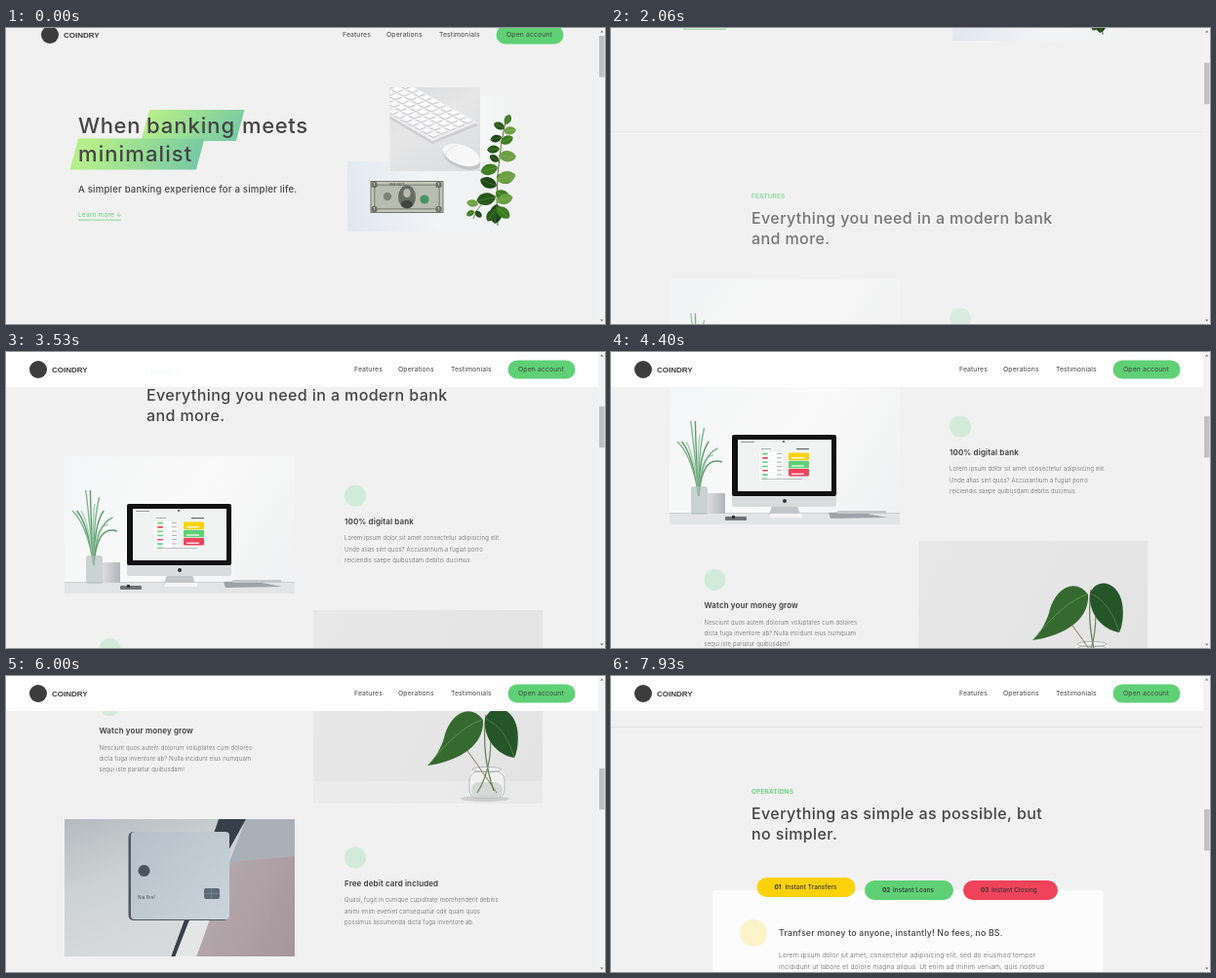
Animation of 614 by 304 pixels, one loop 8 s. Source, as an HTML page with a canvas:

```html
<!DOCTYPE html>
<html lang="en">
<head>
<meta charset="utf-8">
<title>Banking landing page</title>
<style>
  html, body { margin: 0; width: 100%; height: 100%; overflow: hidden; background: #f1f1f1; }
  canvas { display: block; width: 614px; height: 304px; }
</style>
</head>
<body>
<canvas id="stage"></canvas>
<script>
const W = 614, H = 304, LOOP = 8000, STEP = 200 / 3;
const SANS = 'Inter, "Open Sans", sans-serif';
const PAGE = '#f1f1f1', INK = '#444', GREEN = '#5fd075', YELLOW = '#fbd20a', RED = '#f0435c';
const BRAND = 'COINDRY';
const dpr = Math.max(1, Math.round(window.devicePixelRatio || 1));

// ---------- drawing helpers ----------
function text(g, str, x, y, size, weight = 400, color = INK, track = 0.02) {
  g.font = `${weight} ${size}px ${SANS}`;
  g.letterSpacing = size * track + 'px';
  g.fillStyle = color;
  g.fillText(str, x, y + size * 0.36);
}

function rect(g, x, y, w, h, fill, r = 0) {
  g.fillStyle = fill;
  g.beginPath();
  g.roundRect(x, y, w, h, r);
  g.fill();
}

function disc(g, x, y, rx, fill, ry = rx, turn = 0) {
  g.fillStyle = fill;
  g.beginPath();
  g.ellipse(x, y, rx, ry, turn, 0, 7);
  g.fill();
}

function poly(g, fill, ...p) {
  g.fillStyle = fill;
  g.beginPath();
  for (let i = 0; i < p.length; i += 2) g.lineTo(p[i], p[i + 1]);
  g.fill();
}

function curve(g, color, width, x0, y0, cx, cy, x1, y1) {
  g.strokeStyle = color;
  g.lineWidth = width;
  g.beginPath();
  g.moveTo(x0, y0);
  g.quadraticCurveTo(cx, cy, x1, y1);
  g.stroke();
}

function leaf(g, x, y, len, wide, deg, color) {
  g.save();
  g.translate(x, y);
  g.rotate(deg * Math.PI / 180);
  g.fillStyle = color;
  g.beginPath();
  g.moveTo(0, 0);
  g.bezierCurveTo(len * 0.2, -wide, len * 0.8, -wide, len, 0);
  g.bezierCurveTo(len * 0.8, wide, len * 0.2, wide, 0, 0);
  g.fill();
  curve(g, 'rgba(200,230,150,.35)', 0.5, 0, 0, len / 2, 0, len, 0);
  g.restore();
}

function blend(g, x0, y0, x1, y1, ...colors) {
  const grad = g.createLinearGradient(x0, y0, x1, y1);
  colors.forEach((c, i) => grad.addColorStop(i / (colors.length - 1), c));
  return grad;
}

function photo(g, x, y, w, h, fill, paint) {
  g.save();
  g.beginPath();
  g.rect(x, y, w, h);
  g.clip();
  rect(g, x, y, w, h, fill);
  g.translate(x, y);
  paint(g);
  g.restore();
}

// A part of the page, painted once in page coordinates.
function layer(top, height, paint) {
  const c = document.createElement('canvas');
  c.width = W * dpr;
  c.height = height * dpr;
  const g = c.getContext('2d');
  g.scale(dpr, dpr);
  g.translate(0, -top);
  paint(g);
  return { c, top, height };
}

// ---------- page parts ----------
function nav(g, pad, y) {
  disc(g, 33 + pad, y, 9, '#3c3c3c');
  g.font = 'bold 8px "Liberation Sans", Arial, sans-serif';
  g.letterSpacing = '0px';
  g.fillStyle = '#3c3c3c';
  g.fillText(BRAND, 47 + pad, y + 3);
  text(g, 'Features', 357 - pad, y, 6.8);
  text(g, 'Operations', 402 - pad, y, 6.8);
  text(g, 'Testimonials', 456 - pad, y, 6.8);
  rect(g, 514.5 - pad, y - 9.6, 69, 19.2, GREEN, 9.6);
  text(g, 'Open account', 525 - pad, y, 6.8);
}

function highlight(g, x, y, w, h) {
  const skew = h * 0.27;
  poly(g, blend(g, x + w, y + h, x + w * 0.25, y - h * 0.6, '#71c6a6', '#b5ee8a'),
    x + skew, y, x + w, y, x + w - skew, y + h, x, y + h);
}

function keyboard(g) {
  poly(g, '#cfcfd1', 393, 93, 437, 119, 484, 100, 415, 61, 393, 61);
  poly(g, '#efeff0', 393, 90, 437, 116, 483, 97, 415, 59, 393, 59);
  for (let row = 0; row < 5; row++) {
    for (let k = 0; k < 11; k++) {
      const x = 432 + row * 8.6 - k * 7, y = 109 - row * 3.6 - k * 3.95;
      poly(g, '#bfc0c3', x, y + 1, x + 6, y + 4, x + 12.6, y + 1.2, x + 6.4, y - 2);
      poly(g, '#fbfbfb', x, y, x + 6, y + 3, x + 12.2, y + 0.4, x + 6.4, y - 2.6);
    }
  }
}

function bill(g) {
  rect(g, 373.5, 157, 75, 33, '#73776d');
  rect(g, 374.5, 158, 73, 31, '#c3c6ba');
  rect(g, 377, 160.5, 68, 26, '#8b9084');
  rect(g, 378.5, 162, 65, 23, '#b9bdb0');
  text(g, 'ONE NOTE', 393, 160.5, 3, 600, '#53584e');
  for (const [x, y] of [[376, 161], [442, 161], [376, 186], [442, 186]]) {
    disc(g, x + 1.5, y, 3.2, '#6d7267');
    text(g, '1', x + 0.6, y, 4, 700, '#e2e4da');
  }
  disc(g, 411, 173.5, 9, '#686d64', 12);
  disc(g, 411, 169.5, 3.6, '#b7baad', 4.5);
  disc(g, 411, 181, 6, '#3f443d', 4);
  disc(g, 391, 173, 4.2, '#7c8176');
  disc(g, 429, 176, 4.6, '#4b9363');
}

function branch(g) {
  curve(g, '#55703a', 1, 504, 203, 500, 150, 513, 90);
  curve(g, '#55703a', 0.8, 503, 172, 484, 178, 479, 196);
  const tones = ['#3f7d24', '#28591b', '#6d9f45', '#1f4717'];
  const leaves = [
    [512, 99, 11, -65], [511, 103, 12, -155], [510, 106, 13, -5], [508, 112, 12, 165],
    [507, 118, 14, -25], [506, 124, 13, 175], [505, 131, 18, 5], [505, 137, 11, -145],
    [504, 143, 18, 165], [503, 152, 16, 20], [503, 156, 20, -15], [503, 162, 18, 200],
    [502, 168, 17, 30], [502, 174, 20, 170], [503, 178, 17, -15], [503, 181, 20, 95],
    [503, 184, 17, 40], [502, 186, 15, 125], [484, 181, 12, 190], [481, 188, 9, 45],
    [480, 188, 9, 150]
  ];
  leaves.forEach(([x, y, len, deg], i) => leaf(g, x, y, len, len * 0.42, deg, tones[i % 4]));
}

function paintHeader(g) {
  nav(g, 12, 7);
  highlight(g, 138.5, 84, 106, 32);
  highlight(g, 65.5, 113.5, 138, 32);
  text(g, 'When', 74, 100, 22, 500, INK, 0.03);
  text(g, 'banking', 144, 100, 22, 500, INK, 0.045);
  text(g, 'meets', 242, 100, 22, 500, INK, 0.03);
  text(g, 'minimalist', 74, 129.5, 22, 500, INK, 0.05);
  text(g, 'A simpler banking experience for a simpler life.', 74, 166, 9.6, 450);
  text(g, 'Learn more ↓', 74, 191.5, 6.6, 400, GREEN);
  rect(g, 74, 196.7, 44, 0.7, GREEN);

  rect(g, 486, 70, 46, 139, blend(g, 486, 0, 532, 0, '#f6f7f7', PAGE));
  rect(g, 350, 137, 182, 72, blend(g, 350, 209, 532, 160, '#e0e7f0', '#f2f4f6', PAGE));
  g.save();
  g.beginPath();
  g.rect(393.5, 61, 92.5, 86);
  g.clip();
  rect(g, 393, 61, 94, 86, blend(g, 393, 61, 440, 147, '#d9dadb', '#e7e7e8', '#dedfe0'));
  keyboard(g);
  disc(g, 468, 133, 21, '#c3c4c6', 11, 0.35);
  disc(g, 467, 130.5, 20, '#f7f7f7', 10, 0.35);
  curve(g, '#d3d4d6', 0.7, 450, 131, 453, 122, 463, 121);
  g.restore();
  bill(g);
  branch(g);
}

function desk(g) {
  rect(g, 0, 129, 236, 13, '#e3e4e6');
  rect(g, 0, 129, 236, 1, '#cfd1d3');
  // plant and pots
  for (let i = 0; i < 11; i++) {
    const x = 8 + i * 4.6, y = 28 + Math.abs(i - 4) * 7 + (i % 3) * 7;
    curve(g, ['#7eb58c', '#5d9a6d', '#a5cfae'][i % 3], 1.4, 30, 112, 28 + (i - 5), 70, x, y);
  }
  rect(g, 22, 102, 17, 29, 'rgba(176,190,188,.65)', 3);
  rect(g, 39, 109, 18, 21, blend(g, 39, 0, 57, 0, '#dcdddf', '#b2b4b8'), 1);
  rect(g, 57, 133, 22, 4, '#6f7275', 1);
  rect(g, 64, 132, 3, 3, '#2f3133');
  // monitor
  poly(g, '#c4c7ca', 105, 122, 131, 122, 134, 131, 102, 131);
  rect(g, 64, 110, 107, 13, '#d9dbdd', 2);
  rect(g, 64, 49, 107, 63, '#111', 2);
  rect(g, 70, 54, 96, 53, '#f1f2f2');
  disc(g, 118, 117, 2, '#333');
  rect(g, 73, 56, 14, 1, '#999');
  disc(g, 117, 56, 1.2, '#777');
  rect(g, 94, 63, 10, 1, '#aaa');
  rect(g, 130, 63, 13, 1.2, '#666');
  for (let i = 0; i < 7; i++) {
    const y = 67 + i * 4.3;
    rect(g, 92, y, 24, 3.4, '#fff');
    rect(g, 95, y + 0.8, 6, 1.6, i % 3 == 1 ? RED : GREEN, 0.8);
    rect(g, 110, y + 1, 5, 1, '#aaa');
  }
  [YELLOW, GREEN, RED].forEach((c, i) => {
    rect(g, 122, 67.5 + i * 8.3, 21, 7.4, c, 1);
    rect(g, 125, 72 + i * 8.3, 13, 1.4, 'rgba(255,255,255,.85)');
  });
  rect(g, 94, 94, 42, 1, '#bbb');
  // keyboard and notebook
  poly(g, '#9fa3a7', 163, 129, 192, 128, 223, 134, 165, 135);
  rect(g, 172, 127, 50, 3, '#c5c8cb', 1);
  rect(g, 103, 130, 33, 4, '#f6f6f6', 1);
}

function vase(g) {
  rect(g, 0, 118, 236, 24, 'rgba(255,255,255,.22)');
  disc(g, 176, 136, 25, 'rgba(120,120,120,.25)', 3);
  rect(g, 160, 104, 36, 33, 'rgba(248,249,249,.6)', 9);
  rect(g, 162, 119, 32, 17, 'rgba(175,187,183,.45)', 8);
  curve(g, '#5f7a4b', 1.2, 185, 128, 172, 90, 177, 50);
  curve(g, '#6d8957', 1.2, 168, 130, 187, 100, 180, 52);
  curve(g, '#80764f', 1, 188, 130, 168, 100, 150, 76);
  g.strokeStyle = 'rgba(150,155,155,.8)';
  g.lineWidth = 0.8;
  g.beginPath();
  g.ellipse(178, 106, 15, 2.6, 0, 0, 7);
  g.roundRect(160, 108, 36, 28, 9);
  g.stroke();
  g.fillStyle = '#35692f';
  g.beginPath();
  g.moveTo(174, 55);
  g.bezierCurveTo(160, 36, 139, 50, 134, 74);
  g.bezierCurveTo(130, 86, 124, 96, 117, 102);
  g.bezierCurveTo(140, 99, 176, 86, 174, 55);
  g.fill();
  g.fillStyle = '#27552a';
  g.beginPath();
  g.moveTo(176, 54);
  g.bezierCurveTo(183, 36, 205, 42, 209, 64);
  g.bezierCurveTo(211, 76, 209, 88, 206, 94);
  g.bezierCurveTo(188, 91, 174, 74, 176, 54);
  g.fill();
  curve(g, '#76a062', 0.7, 173, 55, 150, 62, 118, 101);
  curve(g, '#5f8d58', 0.7, 177, 54, 196, 62, 206, 93);
}

function card(g) {
  poly(g, '#aab0b7', 186, 0, 236, 0, 236, 62, 162, 62);
  poly(g, blend(g, 150, 104, 236, 141, '#b3a6aa', '#a5969c'), 150, 98, 172, 44, 236, 38, 236, 142, 133, 142);
  poly(g, '#e4e6e6', 122, 100, 150, 100, 135, 142, 112, 142);
  poly(g, '#36404b', 158, 0, 186, 0, 127, 106, 113, 142, 109, 142, 122, 106);
  rect(g, 65.5, 13, 103, 91, '#4f5963', 5);
  rect(g, 68, 13, 101, 90, blend(g, 68, 13, 169, 104, '#b5c0ca', '#cbd4dc'), 4);
  disc(g, 81.5, 53, 6, '#4a545f');
  text(g, 'Nia Brel', 75, 80.5, 4.6, 400, '#4c545c');
  rect(g, 143, 71, 16, 11, '#5b6a77', 2);
  rect(g, 143, 76, 16, 0.6, '#8695a1');
  rect(g, 150.5, 71, 0.6, 11, '#8695a1');
}

function sectionHead(g, top, label, a, b) {
  rect(g, 0, top, 607, 0.5, '#d5d5d5');
  text(g, label, 144, top + 67, 6.6, 600, GREEN, 0.01);
  text(g, a, 144, top + 89, 16, 500, INK, 0.025);
  text(g, b, 144, top + 110, 16, 500, INK, 0.025);
}

function feature(g, x, y, title, lines) {
  disc(g, x + 11, y + 40.5, 11, '#d2ebd8');
  text(g, title, x, y + 67, 8, 600, '#3c3c3c', 0.015);
  lines.forEach((s, i) => text(g, s, x, y + 84 + i * 11.4, 6, 300, '#666'));
}

function paintFeatures(g) {
  sectionHead(g, 293, 'FEATURES', 'Everything you need in a modern bank', 'and more.');
  photo(g, 60, 445, 236, 141, blend(g, 60, 445, 296, 586, '#f4f5f6', '#fafafa', '#eff0f1'), desk);
  feature(g, 347, 445, '100% digital bank', [
    'Lorem ipsum dolor sit amet consectetur adipisicing elit.',
    'Unde alias sint quos? Accusantium a fugiat porro',
    'reiciendis saepe quibusdam debitis ducimus.']);
  photo(g, 315, 603, 235, 141, blend(g, 315, 603, 550, 744, '#e8e8e8', '#e3e3e4'), vase);
  feature(g, 95.5, 602.5, 'Watch your money grow', [
    'Nesciunt quos autem dolorum voluptates cum dolores',
    'dicta fuga inventore ab? Nulla incidunt eius numquam',
    'sequi iste pariatur quibusdam!']);
  photo(g, 60, 760, 236, 141, blend(g, 60, 760, 110, 901, '#b5babf', '#cdd2d4', '#d6dada'), card);
  feature(g, 347, 759, 'Free debit card included', [
    'Quasi, fugit in cumque cupiditate reprehenderit debitis',
    'animi enim eveniet consequatur odit quam quos',
    'possimus assumenda dicta fuga inventore ab.']);
}

function tab(g, x, y, w, fill, num, label) {
  rect(g, x, y, w, 20, fill, 10);
  text(g, num, x + 18, y + 10, 6.3, 700, '#333');
  text(g, label, x + 29, y + 10, 6.3, 450, '#333');
}

function paintOperations(g) {
  sectionHead(g, 963, 'OPERATIONS', 'Everything as simple as possible, but', 'no simpler.');
  rect(g, 104, 1131, 400.5, 140, '#fcfcfc', 3);
  tab(g, 149.5, 1118, 101, YELLOW, '01', 'Instant Transfers');
  tab(g, 260, 1121, 91, GREEN, '02', 'Instant Loans');
  tab(g, 361, 1121, 97, RED, '03', 'Instant Closing');
  disc(g, 146, 1175, 14, '#fdf3cb');
  text(g, 'Tranfser money to anyone, instantly! No fees, no BS.', 172, 1175, 8.8, 450);
  text(g, 'Lorem ipsum dolor sit amet, consectetur adipisicing elit, sed do eiusmod tempor', 172, 1197.5, 6.8, 300, '#666');
  text(g, 'incididunt ut labore et dolore magna aliqua. Ut enim ad minim veniam, quis nostrud', 172, 1210, 6.8, 300, '#666');
}

const header = layer(-11, 304, paintHeader);
const features = layer(293, 670, paintFeatures);
const operations = layer(963, 300, paintOperations);

// ---------- motion ----------
const SCROLL = [
  [0, 0], [730, 75], [1130, 109], [1460, 109], [2060, 195], [3530, 338], [3660, 349],
  [4000, 349], [4530, 429], [4860, 429], [5130, 474], [5530, 549], [5730, 549],
  [6400, 709], [6600, 709], [6930, 777], [7930, 911]
];
const STICKY_AT = 257, RISE = 32;

function scrollAt(t) {
  const i = SCROLL.findIndex(k => k[0] > t);
  if (i < 0) return SCROLL[SCROLL.length - 1][1];
  const [t0, y0] = SCROLL[i - 1], [t1, y1] = SCROLL[i];
  return y0 + (y1 - y0) * (t - t0) / (t1 - t0);
}

// CSS "ease": cubic-bezier(.25, .1, .25, 1)
function ease(x) {
  if (x <= 0) return 0;
  if (x >= 1) return 1;
  const bez = (a, b, u) => 3 * a * u * (1 - u) ** 2 + 3 * b * u * u * (1 - u) + u ** 3;
  let lo = 0, hi = 1;
  for (let i = 0; i < 20; i++) {
    const mid = (lo + hi) / 2;
    if (bez(0.25, 0.25, mid) < x) lo = mid; else hi = mid;
  }
  return bez(0.1, 1, lo);
}

const stage = document.getElementById('stage');
stage.width = W * dpr;
stage.height = H * dpr;
const g = stage.getContext('2d');
g.scale(dpr, dpr);

function place(part, scroll, shown = 1) {
  if (shown <= 0) return;
  const y = Math.round((part.top - scroll + RISE * (1 - shown)) * dpr) / dpr;
  if (y > H || y + part.height < 0) return;
  g.globalAlpha = shown;
  g.drawImage(part.c, 0, y, W, part.height);
  g.globalAlpha = 1;
}

function scrollbar(scroll) {
  rect(g, 607.3, 0, 6.7, H, '#f2f2f2');
  rect(g, 608, 8 + scroll * 0.1414, 5.6, 42.5, '#c1c1c1');
  poly(g, '#777', 609, 4.6, 612.4, 4.6, 610.7, 2.6);
  poly(g, '#777', 609, 299.4, 612.4, 299.4, 610.7, 301.4);
}

function draw(t) {
  const scroll = scrollAt(t);
  rect(g, 0, 0, W, H, PAGE);
  place(header, scroll);
  place(features, scroll, ease((t - 1640) / 1000));
  place(operations, scroll, ease((t - 6900) / 1000));
  if (scroll > STICKY_AT) {
    rect(g, 0, 0, 607.3, 36, 'rgba(255,255,255,.95)');
    nav(g, 0, 18);
  }
  scrollbar(scroll);
}

function tick(now) {
  const t = now % LOOP;
  draw(Math.floor((t + 7) / STEP) * STEP % LOOP);
  requestAnimationFrame(tick);
}
draw(0);
requestAnimationFrame(tick);
</script>
</body>
</html>
```
